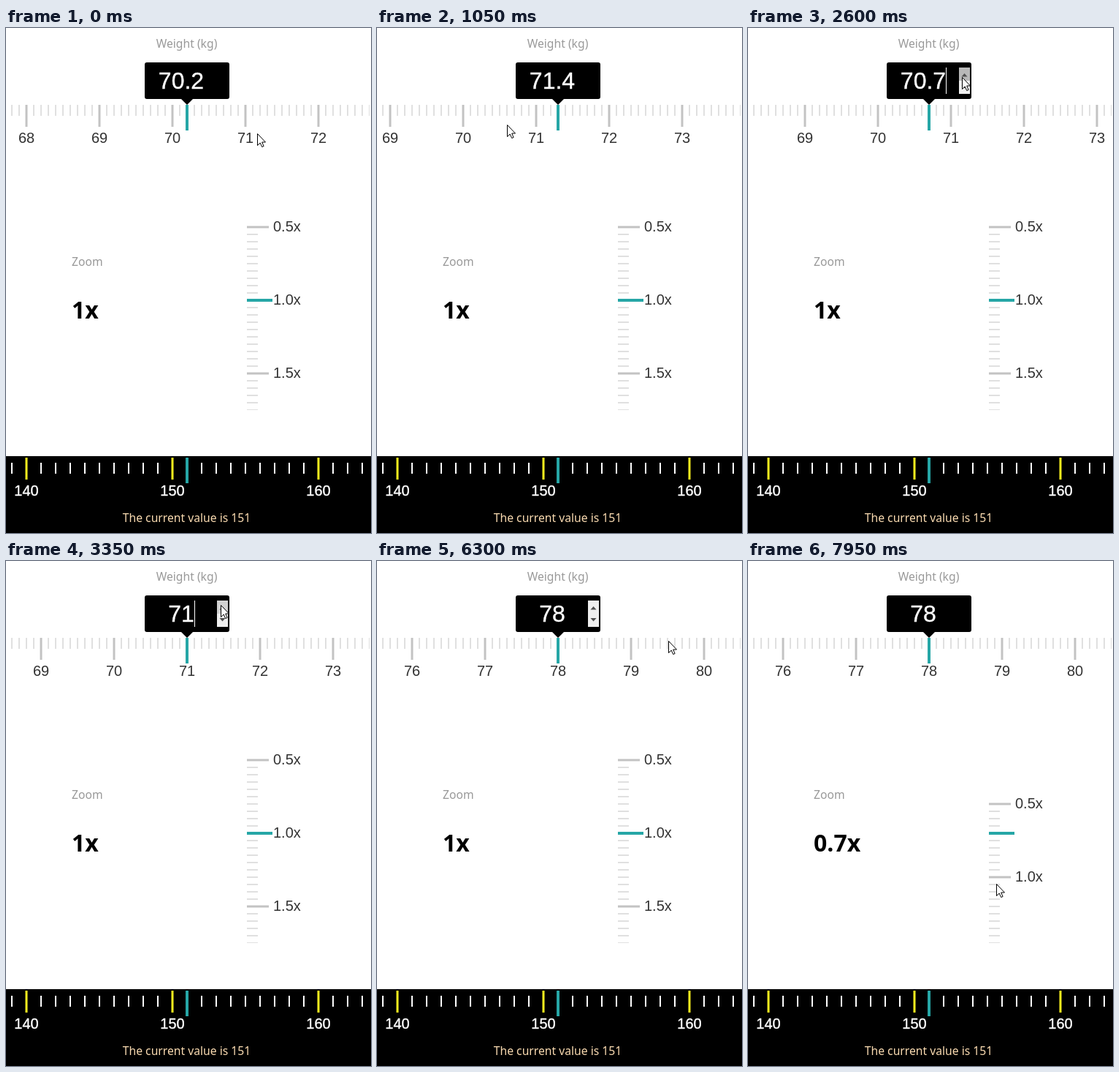
An HTML page with a canvas that plays this animation: 500 by 690 pixels, repeating every 8000 ms.

```html
<!DOCTYPE html>
<html lang="en">
<head>
<meta charset="utf-8">
<title>Ruler pickers</title>
<style>
  html, body { margin: 0; width: 100%; height: 100%; overflow: hidden; background: #fff; }
  canvas { display: block; }
</style>
</head>
<body>
<canvas id="stage" width="500" height="690"></canvas>
<script>
const ctx = document.getElementById('stage').getContext('2d');
const LOOP = 8000, STEP = 50;
const TEAL = '#26a6a6', MINOR = '#e0e0e0', MAJOR = '#c3c3c3';
const ARIAL = '"Liberation Sans", Arial, sans-serif';
const NOTO = '"Noto Sans", "Open Sans", sans-serif';
const SMALL = '15.7px ' + NOTO;
const LABEL = '20px ' + ARIAL;

const GRAB = { x: 309, y: 371 };  // where the two drags take hold
const GAIN = 6 / 7;               // ruler travel per pointer pixel

// Pointer moves: start, end, and the point reached
const moves = [
  [0, 150, GRAB.x, 138],
  [300, 750, 169, 134],
  [1000, 1650, 287, 113],
  [1650, 1800, 293, 67],
  [3300, 3350, 294, 60],
  [3350, 3600, 249, 65],
  [3850, 3900, 252, 69],
  [6050, 6300, 399, 109],
  [6550, 6750, 488, 225],
  [6750, 6950, 340, GRAB.y],
  [7400, 7950, 340, GRAB.y + 70]
];

function pointer(t) {
  let x = 344, y = 144;
  for (const [from, to, toX, toY] of moves) {
    const k = Math.max(0, Math.min(1, (t - from) / (to - from)));
    x += (toX - x) * k;
    y += (toY - y) * k;
  }
  return { x: Math.round(x), y: Math.round(y) };
}

const snap = (v, perUnit) => Math.round(v * perUnit) / perUnit;
const within = (v, a, b) => v >= a && v < b;

function dragged(t) {
  if (t < 300) return 70.2;
  const x = pointer(Math.min(t, 1650)).x;
  return snap(70.2 + (GRAB.x - x) * GAIN / 100, 10);
}

// Six spinner clicks, 150 ms apart
function clicked(t) {
  const n = Math.floor((t - 2100) / 150);
  return snap(70.4 + 0.1 * Math.max(0, Math.min(6, n)), 10);
}

const typed = t => t < 5550 ? 7 : 78;

function rulerValue(t) {
  if (t < 2000) return dragged(t);
  return t < 5150 ? clicked(t - STEP) : typed(t);
}

function fieldValue(t) {
  if (t < 2000) return dragged(t - STEP);
  return t < 5000 ? clicked(t) : typed(t);
}

function zoomValue(t) {
  const dy = t < 7400 ? 0 : pointer(t).y - GRAB.y;
  return snap(1 - dy * GAIN / 200, 20);
}

// Each edit restarts the 500 ms blink
function caretOn(t) {
  const edit = [2250, 2700, 3150, 3650, 5050, 5600].findLast(e => e <= t);
  return t < 7150 && Math.floor((t - edit) / 500) % 2 === 0;
}

function rect(x, y, w, h, color) {
  ctx.fillStyle = color;
  ctx.fillRect(x, y, w, h);
}

function text(s, x, y, font, color, align = 'left', weight = 0) {
  ctx.font = font;
  ctx.fillStyle = ctx.strokeStyle = color;
  ctx.textAlign = align;
  ctx.fillText(s, x, y);
  if (weight) {
    ctx.lineWidth = weight;
    ctx.strokeText(s, x, y);
  }
}

function poly(points, color) {
  ctx.beginPath();
  points.forEach(([x, y]) => ctx.lineTo(x, y));
  ctx.closePath();
  ctx.fillStyle = color;
  ctx.fill();
}

function clipped(x, y, w, h, draw) {
  ctx.save();
  ctx.beginPath();
  ctx.rect(x, y, w, h);
  ctx.clip();
  draw();
  ctx.restore();
}

function weightRuler(value) {
  const center = Math.round(value * 10);
  clipped(0, 100, 498, 65, () => {
    for (let n = center - 27; n <= center + 27; n++) {
      const x = 248 + (n - center) * 10;
      if (n % 10) {
        rect(x - 1, 105, 2, 15, MINOR);
      } else {
        rect(x - 1.5, 105, 3, 30, MAJOR);
        text(n / 10, x, 157, LABEL, '#333', 'center');
      }
    }
  });
  rect(246, 105, 4, 35, TEAL);
}

function spinner(t, overUp) {
  rect(289, 54, 15, 36, '#efefef');
  if (overUp) rect(289, 54, 15, 18, within(t, 2250, 3150) ? '#b8b8b8' : '#d2d2d2');
  poly([[292.5, 66.5], [296.5, 62], [300.5, 66.5]], '#505050');
  poly([[292.5, 78], [296.5, 82.5], [300.5, 78]], '#505050');
}

function weightField(t, p) {
  ctx.beginPath();
  ctx.roundRect(190, 47, 116, 50, 3);
  ctx.fillStyle = '#000';
  ctx.fill();
  poly([[240, 97], [256, 97], [248, 105]], '#000');
  const value = String(fieldValue(t));
  text(value, 240, 83, '32px ' + ARIAL, '#fff', 'center', 0.4);
  const end = Math.round(240 + ctx.measureText(value).width / 2);
  if (caretOn(t)) rect(end, 54, 1, 36, '#fff');
  if (within(t, 1750, 7250)) spinner(t, within(p.x, 289, 304) && within(p.y, 54, 72));
}

function zoomRuler(value) {
  const center = Math.round(value * 20);
  clipped(330, 255, 80, 267, () => {
    for (let n = 10; n <= center + 16; n++) {
      const y = 372 + (n - center) * 10;
      if (n % 10) {
        rect(330, y - 1, 15, 2, MINOR);
      } else {
        rect(330, y - 1.5, 30, 3, MAJOR);
        text((n / 20).toFixed(1) + 'x', 366, y + 6, LABEL, '#333');
      }
    }
  });
  rect(330, 370, 35, 4, TEAL);
  text('Zoom', 90, 325, SMALL, '#999');
  text(value + 'x', 90, 396.5, '600 32px ' + NOTO, '#000');
}

function darkRuler() {
  rect(0, 585, 500, 105, '#000');
  for (let n = 139; n <= 163; n++) {
    const x = 248 + (n - 151) * 20;
    if (n % 10) {
      rect(x - 1, 594, 2, 15, '#fff');
    } else {
      rect(x - 1.5, 587, 3, 30, '#f9f01e');
      text(n, x, 639, LABEL, '#fff', 'center', 0.4);
    }
  }
  rect(246, 587, 4, 35, TEAL);
  text('The current value is 151', 247.5, 675, SMALL, '#f9dab0', 'center');
}

function arrow(x, y) {
  ctx.save();
  ctx.translate(x + 0.5, y + 0.5);
  poly([[0, 0], [0, 16], [3.7, 12.5], [6.2, 18], [8.6, 17], [6.2, 11.5], [11, 11.5]], '#fff');
  ctx.strokeStyle = '#000';
  ctx.lineWidth = 1;
  ctx.stroke();
  ctx.restore();
}

function beam(x, y) {
  const color = '#ddd';
  rect(x, y - 7, 1, 14, color);
  for (const dy of [-8, 7]) {
    rect(x - 3, y + dy, 3, 1, color);
    rect(x + 1, y + dy, 3, 1, color);
  }
}

function draw(now) {
  const t = Math.floor(now % LOOP / STEP) * STEP;
  const p = pointer(t);
  rect(0, 0, 500, 690, '#fff');
  text('Weight (kg)', 247.5, 27, SMALL, '#999', 'center');
  weightRuler(rulerValue(t));
  weightField(t, p);
  zoomRuler(zoomValue(t));
  darkRuler();
  const overText = within(p.x, 200, 289) && within(p.y, 50, 92);
  (overText ? beam : arrow)(p.x, p.y);
}

const start = performance.now();
function tick() {
  draw(performance.now() - start);
  requestAnimationFrame(tick);
}
tick();
</script>
</body>
</html>
```
